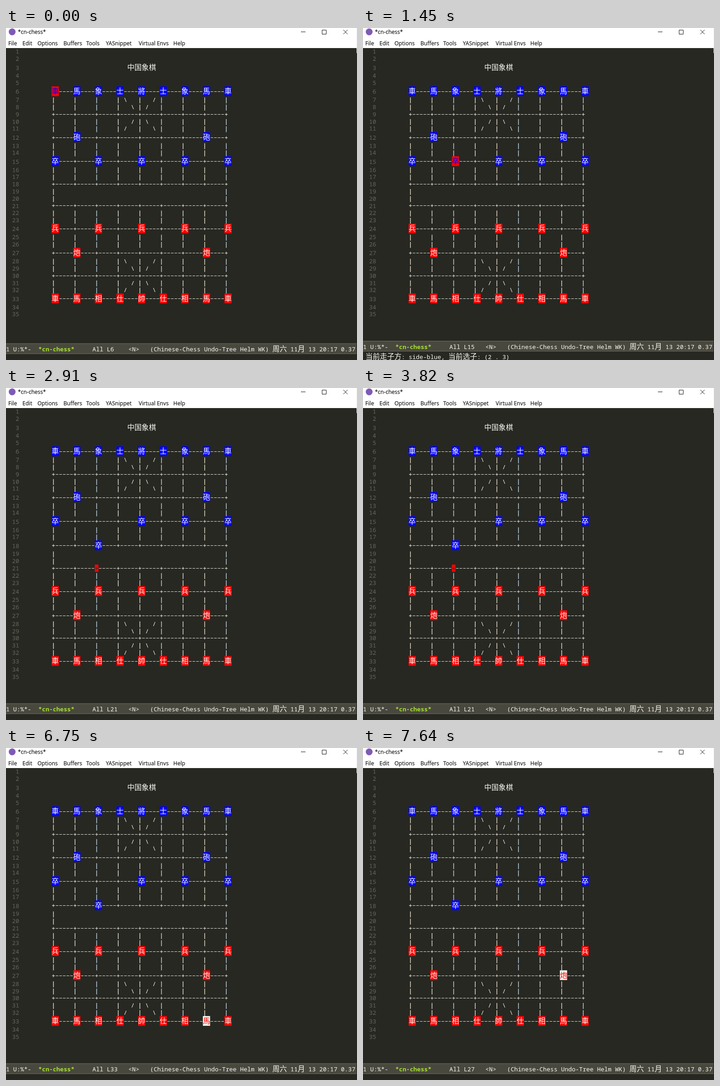
Write an HTML page with a canvas that moves like this. It is 770 px wide and 728 px high and loops after 8 s.

```html
<!DOCTYPE html>
<html lang="zh">
<head>
<meta charset="utf-8">
<style>
html, body { margin: 0; width: 100%; height: 100%; overflow: hidden; background: #272822; }
canvas { display: block; }
</style>
</head>
<body>
<canvas id="stage" width="770" height="728"></canvas>
<script>
const ctx = document.getElementById('stage').getContext('2d');
const LOOP = 8000, CELL = 7.9, LOW = 15.8, TALL = 21.33, LEFT = 100.1, TOP = 43.5;
const BG = '#272822', FG = '#f8f8f2', RED = '#f00', BLUE = '#00f';
const MONO = '13.17px "Noto Sans Mono", monospace';
const CJK = '15.8px "Noto Sans CJK SC", "Noto Sans CJK", sans-serif';
const UI = '12px "Noto Sans", "Open Sans", sans-serif';
const BARS = ['#eee2cc', '#e4e2da', '#c4d8e8', '#e8e4d8', '#eee2cc', '#c4d8e8', '#e4e2da', '#eee2cc', '#c4d8e8'];

const START = {
  0: '車馬象士將士象馬車', 2: '.砲.....砲.', 3: '卒.卒.卒.卒.卒',
  6: '兵.兵.兵.兵.兵', 7: '.炮.....炮.', 9: '車馬相仕帥仕相馬車'
};
const MOVED = { ...START, 3: '卒...卒.卒.卒', 4: '..卒......' };

const PICK_BLUE = '当前走子方: side-blue, 当前选子: (2 . 3)';
const PICK_RED = '当前走子方: side-red, 当前选子: (7 . 9)';
const MOVE = 'move piece from (2 . 3) to (2 . 4)';

// time, line, column, message, cursor hidden
const STEPS = [
  [0, 6, 0], [150, 9, 0], [290, 12, 0], [430, 15, 0], [720, 15, 1], [1010, 15, 2],
  [1450, 15, 2, PICK_BLUE], [1750, 18, 2], [2040, 18, 2, MOVE], [2630, 18, 2, MOVE, true],
  [2910, 21, 2], [3210, 24, 2], [3370, 27, 2], [3670, 24, 2], [3820, 21, 2],
  [4290, 21, 2, '', true], [4440, 24, 2], [4750, 27, 2], [5170, 27, 3], [5450, 27, 5],
  [5600, 27, 6], [5880, 27, 7], [6320, 30, 7], [6750, 33, 7], [7190, 33, 7, PICK_RED],
  [7490, 30, 7], [7640, 27, 7]
];

const isWide = c => c > '\u2e80';

function rect(x, y, w, h, color) {
  ctx.fillStyle = color;
  ctx.fillRect(x, y, w, h);
}

function write(s, x, y, color = FG, bold = '') {
  ctx.fillStyle = color;
  for (const c of s) {
    ctx.font = isWide(c) ? CJK : bold + MONO;
    ctx.fillText(c, x, y);
    x += isWide(c) ? 2 * CELL : CELL;
  }
}

function label(s, x, y) {
  ctx.font = UI;
  ctx.fillStyle = '#000';
  ctx.fillText(s, x, y);
}

function drawWindowBar() {
  rect(0, 0, 769, 44, '#fff');
  rect(769, 0, 1, 55, '#eee');
  ctx.fillStyle = '#7f5ab6';
  ctx.beginPath();
  ctx.arc(13.5, 8.5, 7.5, 0, 7);
  ctx.fill();
  label('*cn-chess*', 26, 13);
  const menu = { File: 5, Edit: 36, Options: 69, Buffers: 126, Tools: 176, YASnippet: 219, 'Virtual Envs': 291, Help: 367 };
  for (const name in menu) label(name, menu[name], 38);
  ctx.strokeStyle = '#111';
  ctx.lineWidth = 1;
  ctx.beginPath();
  ctx.moveTo(647, 8.5); ctx.lineTo(657, 8.5);
  ctx.rect(693.5, 4.5, 9, 9);
  ctx.moveTo(740, 4); ctx.lineTo(749.5, 13.5);
  ctx.moveTo(749.5, 4); ctx.lineTo(740, 13.5);
  ctx.stroke();
}

const dashY = base => Math.round(base - 5.2);

function drawPlus(x, base, color) {
  const mid = x + CELL / 2, y = dashY(base);
  rect(mid - 3, y, 6, 1, color);
  rect(mid - 0.5, y - 2.5, 1, 6, color);
}

function drawPoint(piece, x, top, base, red, cursor) {
  if (piece !== '.') {
    let back = red ? RED : BLUE, ink = FG;
    if (cursor) [back, ink] = red ? [FG, RED] : [RED, BLUE];
    rect(x, top, 2 * CELL, TALL, back);
    write(piece, x, base, ink);
    return;
  }
  if (cursor) rect(x, base - 12.8, CELL, LOW, RED);
  drawPlus(x, base, cursor ? BG : FG);
}

function drawRank(pieces, rank, top, base, cursorCol) {
  for (let i = 0; i < 9; i++) {
    const x = LEFT + i * 6 * CELL, piece = pieces[i];
    if (i < 8) {
      for (let k = piece === '.' ? 1 : 2; k < 6; k++) rect(x + k * CELL + 1.1, dashY(base), 5.7, 1, '#e4e4dc');
    }
    drawPoint(piece, x, top, base, rank > 4, i === cursorCol);
  }
}

function drawBetween(line, base) {
  const river = line === 19 || line === 20;
  for (let i = 0; i < 9; i += river ? 8 : 1) {
    rect(LEFT + (i * 6 + 0.5) * CELL - 0.7, base - 10, 1.4, 13, BARS[i]);
  }
  const step = (line - 7) % 21;
  if (step > 4) return;
  const inset = [20, 22, 0, 22, 20][step], marks = step < 2 ? '\\/' : '/\\';
  write(marks[0], LEFT + inset * CELL, base);
  write(marks[1], LEFT + (48 - inset) * CELL, base);
}

function drawBuffer(ranks, line, col, hidden) {
  let top = TOP;
  for (let n = 1; n <= 35; n++) {
    const rank = (n - 6) / 3, onRank = n >= 6 && n <= 33 && n % 3 === 0;
    const tall = n === 3 || (onRank && ranks[rank]);
    const base = top + (tall ? 16.4 : 12.9);
    write(String(n), 29 - String(n).length * CELL, base, '#66655b');
    if (n === 3) write('中国象棋', LEFT + 21 * CELL, base);
    else if (onRank) drawRank(ranks[rank] || '.........', rank, top, base, n === line && !hidden ? col : -1);
    else if (n > 6 && n < 33) drawBetween(n, base);
    top += tall ? TALL : LOW;
  }
}

function drawStatus(line, message) {
  const y = message && isWide(message[0]) ? 686 : 691.5;
  rect(0, y, 769, 23.2, '#75715e');
  rect(0, y + 1, 769, 21.2, '#49483e');
  const base = y + 17.6;
  write('1 U:%*-', 0, base);
  write('*cn-chess*', 9 * CELL, base, '#a6e22e', 'bold ');
  write('All L' + line, 24 * CELL, base);
  write('<N>', 34 * CELL, base);
  write('(Chinese-Chess Undo-Tree Helm WK) 周六 11月 13 20:17 0.37', 40 * CELL, base);
  if (message) write(message, 5.5, isWide(message[0]) ? 725.6 : 727.6);
}

function frame(now) {
  const t = now % LOOP;
  const [, line, col, message, hidden] = STEPS.findLast(s => s[0] <= t);
  rect(0, 0, 770, 728, BG);
  drawWindowBar();
  drawBuffer(t < 2040 ? START : MOVED, line, col, hidden);
  drawStatus(line, message);
  requestAnimationFrame(frame);
}
requestAnimationFrame(frame);
</script>
</body>
</html>
```
